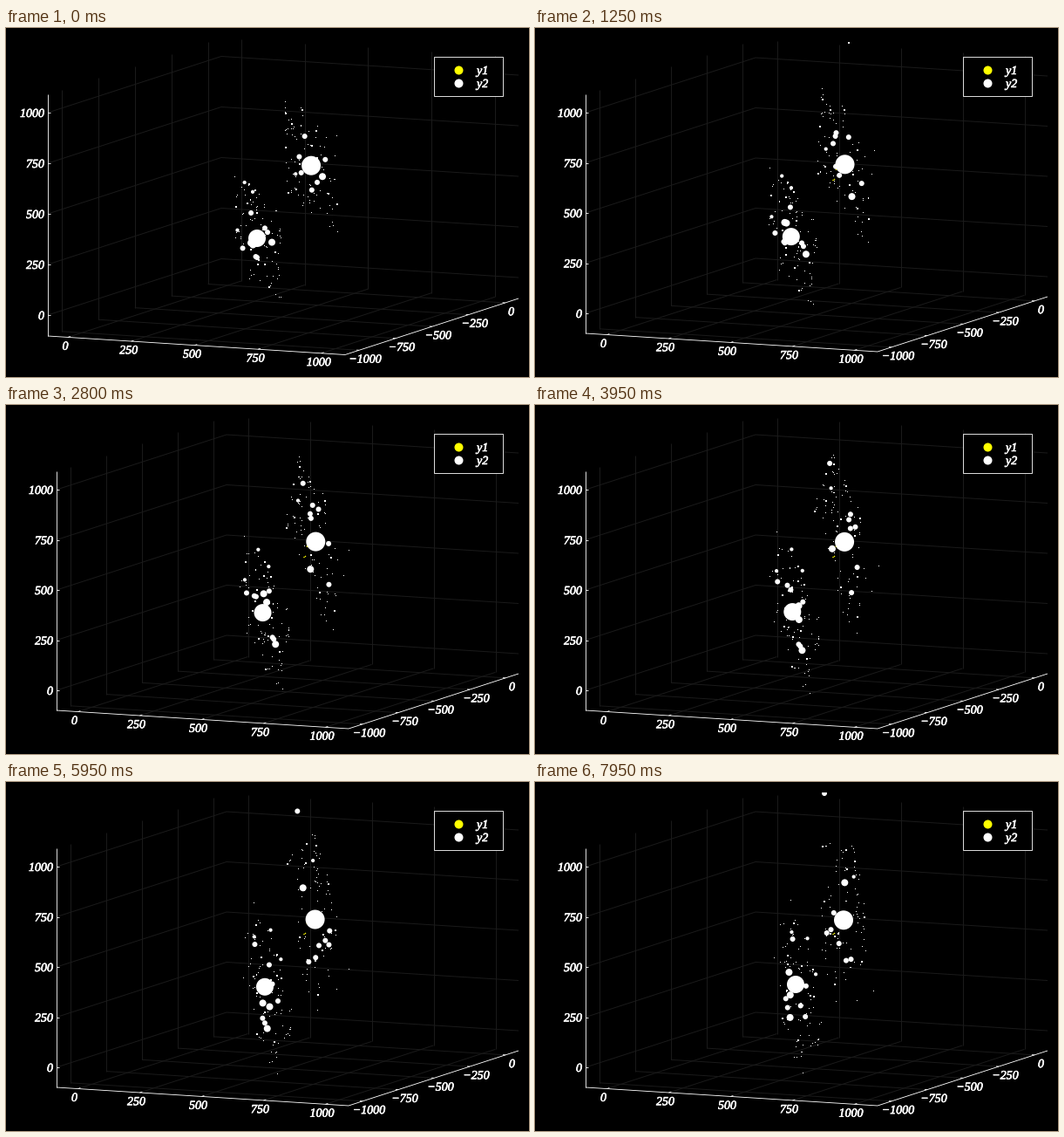
These frames come from a looping animation (600 px wide and 400 px high, 8000 ms). A matplotlib script:

```python
import numpy as np
import matplotlib.pyplot as plt
from matplotlib import patheffects
from matplotlib.animation import FuncAnimation
from matplotlib.collections import LineCollection
from matplotlib.patches import Rectangle

W, H, DPI = 600, 400, 100
FRAMES, STEP = 160, 50
PT = 72 / DPI
GRID = "#1a1a1a"
SHIFT = np.array([5.5, -1.5])  # opening view to settled view

TIME = np.arange(FRAMES) * STEP / 1000
EASE = TIME / TIME[-1]


def glide(start, end, ease):
    """Path from start to end, one point per frame."""
    return np.array(start) + np.outer(ease, np.subtract(end, start))


class Galaxy:
    """A star with bodies and dust on widening Kepler orbits in a tilted plane."""

    def __init__(self, start, end, pull, side, up):
        self.star = glide(start, end, EASE ** 1.6)
        self.pull = np.radians(pull)
        self.basis = np.array([side, up])

    def orbits(self, radius, phase, growth):
        """Screen positions, shaped (frame, body, xy)."""
        swell = 1 - (1 - EASE[:, None]) ** 2
        r = radius * (1 + growth * swell)
        speed = self.pull * (r * r + 0.002) ** -0.75
        turned = np.cumsum(speed, axis=0) - speed
        a = phase - turned * STEP / 1000
        flat = np.stack([r * np.cos(a), r * np.sin(a)], axis=-1)
        return self.star[:, None] + flat @ self.basis

    def bodies(self, *specs):
        radius, degrees, growth = np.array(specs, float).T
        return self.orbits(radius, np.radians(degrees), growth)

    def dust(self, seed, count):
        """A square sheet of specks that the orbits shear apart."""
        rng = np.random.default_rng(seed)
        x = rng.uniform(-0.86, 0.86, count)
        y = rng.uniform(-0.62, 0.64, count)
        r = np.maximum(np.hypot(x, y), 0.25)
        return self.orbits(r, np.arctan2(y, x), rng.uniform(0, 0.13, count))


lower = Galaxy((293.5, 239.5), (299, 232), 5.9, (33, 26), (0, -88))
upper = Galaxy((355.6, 156.2), (354, 158.3), 9.8, (36, 30), (0, -93))

# Orbits as (radius, phase in degrees, growth), grouped by drawn size
groups = [
    (10, lower.star[:, None]),
    (11, upper.star[:, None]),
    (2.1, lower.bodies((0.74, 126, 0.12), (0.58, 105, 0.34), (0.69, 188, -0.05))),
    (2.1, upper.bodies((0.56, 208, 0.28))),
    (3, lower.bodies((0.57, 209, 0), (0.34, 128, 0.37), (0.41, 27, 0.16),
                     (0.345, 38, 0.29), (0.256, 260, 0.45), (0.25, 270, 0.14))),
    (3, upper.bodies((0.36, 125, 0.31), (0.5, 26, 0.26), (0.38, 182, 0.26),
                     (0.37, 211, 0.27), (0.295, 274, 0.24), (0.24, 323, 0.3))),
    (4, lower.bodies((0.525, 11, 0), (0.19, 222, 0.3), (0.245, 210, 0.1))),
    (4, upper.bodies((0.36, -3, 0.32))),
    (3, glide((348, 154), (332, 13), 1 - (1 - EASE) ** 1.4)[:, None]),
]
globe_path = np.concatenate([p for _, p in groups], axis=1)
globe_width = np.concatenate([np.full(p.shape[1], 2 * r) for r, p in groups])

# Two specks are flung out of the discs at constant speed
rising = glide((356, 157), (360, 17), TIME / 1.25)[:, None]
falling = glide((296, 239), (302, 371), np.maximum(TIME - 2.85, 0) / 0.65)[:, None]
dust_path = np.concatenate([lower.dust(4, 88), upper.dust(11, 88), rising, falling], axis=1)
dust_width = np.where(np.arange(dust_path.shape[1]) % 7 == 1, 2, 1)

for path in (globe_path, dust_path):
    path[0] -= SHIFT

fig = plt.figure(figsize=(W / DPI, H / DPI), dpi=DPI, facecolor="black")
ax = fig.add_axes([0, 0, 1, 1])
ax.set_xlim(0, W)
ax.set_ylim(H, 0)
ax.axis("off")
BOLD = [patheffects.withStroke(linewidth=0.45, foreground="white")]


def label(x, y, text, ha="center"):
    return ax.text(x, y, text, color="white", ha=ha, va="center_baseline",
                   family="Liberation Serif", style="italic", size=14 * PT,
                   path_effects=BOLD, zorder=2)


def lines(segments, color, width, z):
    group = LineCollection(segments, colors=color, linewidths=width * PT, zorder=z)
    return ax.add_collection(group, autolim=False)


def box(left, front, right, zero, xtick, ytick, xoff, yoff):
    """Axes, grid and labels of one view; returns its artists."""
    a, b, c = (np.array(p, float) for p in (left, front, right))
    along, deep = b - a, c - b
    rise = np.array([0, 76 - a[1]])
    ua, ud = along / np.hypot(*along), deep / np.hypot(*deep)
    grid, marks = [], [(a, a + rise), (a, b), (b, c)]
    art = []
    for i in range(5):
        value = 250 * i
        p = a + along * (xtick[0] + i * xtick[1]) / along[0]
        grid += [(p, p + deep), (p + deep, p + deep + rise)]
        marks.append((p, p + 3 * ud))
        art.append(label(p[0] + xoff, p[1] + 9.3, str(value)))

        q = a + deep * (ytick[0] + i * ytick[1]) / deep[0]
        grid += [(q, q + along), (q, q + rise)]
        marks.append((q + along, q + along - 3 * ua))
        name = str(value - 1000).replace("-", "\u2212")
        art.append(label(q[0] + along[0] + yoff, q[1] + along[1] + 9.3, name))

        s = np.array([a[0], zero + (97 - zero) * i / 4])
        grid += [(s, s + deep), (s + deep, s + deep + along)]
        marks.append((s, s + (3, 0)))
        art.append(label(a[0] - 4, s[1], str(value), "right"))
    return art + [lines(grid, GRID, 1, 0), lines(marks, "white", 0.85, 1)]


opening = box((48, 353), (389, 374.5), (588, 310), 329, (23, 72.7), (16, 41.9), -3, 7)
settled = box((58, 350), (393, 371), (588, 308), 327, (24.5, 71), (16, 41), -4, 7.5)


def scatter(color, z, width, marker="o", **kw):
    pts = ax.scatter([], [], c=color, marker=marker, linewidths=0, zorder=z, **kw)
    pts.set_sizes((np.asarray(width, float) * PT) ** 2)
    pts.set_clip_path(Rectangle((0, 11.5), W, 361, transform=ax.transData))
    return pts


sparks = scatter("yellow", 3, [1.5, 1.5, 1.8])
dust = scatter("white", 4, dust_width, "s", antialiased=False)
globes = scatter("white", 5, globe_width)
sparks.set_offsets([(342, 174.5), (343.5, 173.5), (345.5, 162)])

ax.add_patch(Rectangle((491, 32.6), 79, 45, fc="black", ec="white", lw=0.85 * PT, zorder=6))
for y, color, name in ((47.5, "yellow", "y1"), (62.5, "white", "y2")):
    ax.scatter([518.5], [y], s=(10 * PT) ** 2, c=color, linewidths=0, zorder=7)
    label(540, y + 0.5, name, "left").set_zorder(7)


def draw(n):
    for art in opening:
        art.set_visible(n == 0)
    for art in settled + [sparks]:
        art.set_visible(n > 0)
    globes.set_offsets(globe_path[n])
    dust.set_offsets(dust_path[n])
    return globes, dust, sparks


anim = FuncAnimation(fig, draw, frames=FRAMES, interval=STEP, repeat=True,
                     repeat_delay=0, blit=False)
plt.show()
```
